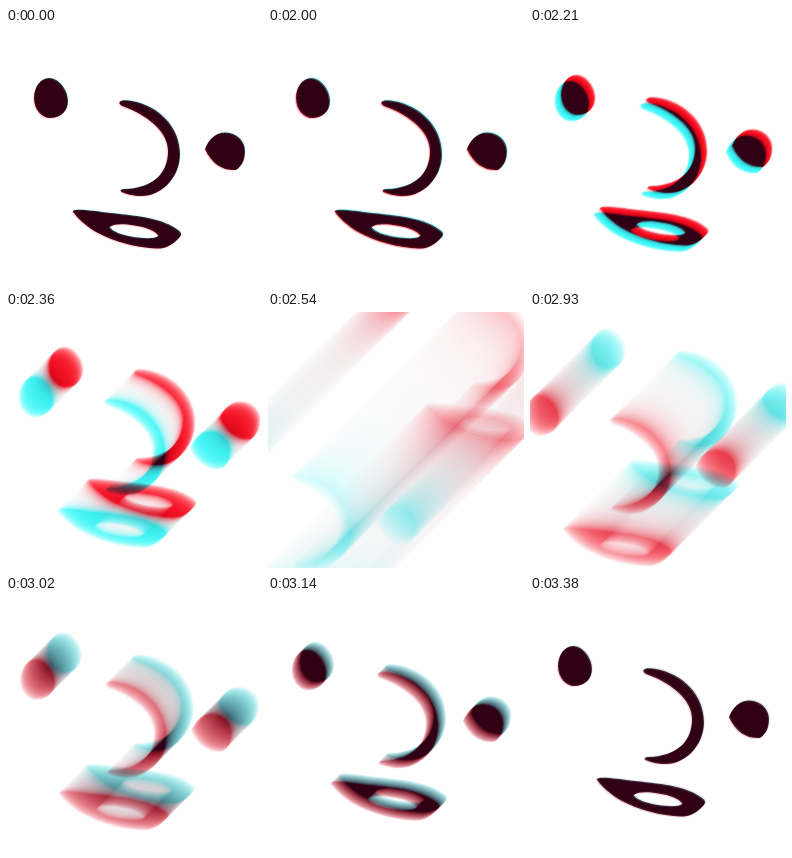
Write an HTML page with a canvas that moves like this. It is 256 px wide and 256 px high and loops after 3410 ms.

```html
<!DOCTYPE html>
<html lang="en">
<head>
<meta charset="utf-8">
<title>Face smear</title>
<style>
  html, body { margin: 0; width: 100%; height: 100%; overflow: hidden; background: #fff; }
  canvas { display: block; width: 100vw; height: 100vh; }
</style>
</head>
<body>
<canvas id="stage" width="256" height="256"></canvas>
<script>
const SIZE = 256, LOOP = 3410, HOLD = 2000, STEP = 30;
const MIDDLE = 2685, REACH = 377, HALVING = 70.5;
const COPIES = 80, FALL = 4.5;
const INK = { r: 207, g: 255, b: 235 }; // light taken away by the full face

const ctx = document.getElementById('stage').getContext('2d');
const image = ctx.createImageData(SIZE, SIZE);

const face = new Path2D([
  'M43 50C53 50 62 62 62 73C62 83 55 90 44 90C36 90 28 82 28 70C28 60 34 50 43 50Z',
  'M199 121C203 111 210 104 220 104.5C231 105 239 113 239 123C239 132 236 138 230 142C218 143 206 137 199 121Z',
  'M114 73.5C116 72 122 72 126 73C153 78 174 99 174 126C174 150 155 168 136 168C127 168 119 166 115 163.5C114 162 115 161 118 161C150 160 162 143 162 123C162 105 144 88 116 78C113 76 113 74 114 73.5Z',
  'M66.5 183C70 180 88 183 105 185C135 188 158 191 172 202C176 205 176 207 173 210C166 218 158 221 150 220.5C132 220 108 214 90 204C80 198 71 190 66.5 183Z',
  'M103.5 199C109 195.5 118 196 128 197.5C140 199 150 203 152.5 208C148 211 138 210.5 128 209C116 207 107 204 103.5 199Z'
].join(''));

// Covered pixels of the face as { x, y, a }
function readMask() {
  const c = document.createElement('canvas');
  c.width = c.height = SIZE;
  const g = c.getContext('2d');
  g.fill(face, 'evenodd');
  const data = g.getImageData(0, 0, SIZE, SIZE).data;
  const dots = [];
  for (let i = 0; i < SIZE * SIZE; i++) {
    const a = data[i * 4 + 3] / 255;
    if (a) dots.push({ x: i % SIZE, y: i / SIZE | 0, a });
  }
  return dots;
}

const dots = readMask();
const cyan = new Float32Array(SIZE * SIZE);
const red = new Float32Array(SIZE * SIZE);

// Copies lie at k from -1 to 1; their weight peaks at k = 1
const ks = Array.from({ length: COPIES }, (_, i) => 2 * i / (COPIES - 1) - 1);
const peaks = ks.map(k => Math.exp(-FALL * (1 - k)));
const peakSum = peaks.reduce((a, b) => a + b);

// Signed diagonal distance of the colour split: shoots out, returns from the other side
function split(t) {
  if (t < HOLD) return -0.2;
  if (t >= MIDDLE) return -REACH * 2 ** ((MIDDLE - t) / HALVING);
  const windUp = 0.85 * Math.max(0, 1 - (t - HOLD) / 200);
  return REACH * 2 ** ((t - MIDDLE) / HALVING) - windUp;
}

// Weights of whole-pixel shifts: a peak at the end plus an even trail
function trail(d, returning) {
  const len = Math.abs(d);
  const far = Math.max(0.2, 0.93 - 0.0033 * len);
  const peak = returning ? Math.min(far, 0.25 + 0.0125 * len) : far;
  const taps = new Map();
  const add = (shift, w) => taps.set(shift, (taps.get(shift) || 0) + w);
  ks.forEach((k, i) => {
    const w = peak * peaks[i] / peakSum + (1 - peak) / COPIES;
    const base = Math.floor(k * d), part = k * d - base;
    add(base, w * (1 - part));
    add(base + 1, w * part);
  });
  return taps;
}

function smear(out, taps, sign) {
  out.fill(0);
  for (const [shift, w] of taps) {
    const s = shift * sign;
    if (!w || Math.abs(s) >= SIZE) continue;
    for (const p of dots) {
      const x = p.x + s, y = p.y - s;
      if (x >= 0 && x < SIZE && y >= 0 && y < SIZE) out[y * SIZE + x] += p.a * w;
    }
  }
}

function draw(t) {
  const taps = trail(split(t), t >= MIDDLE);
  smear(red, taps, 1);
  smear(cyan, taps, -1);
  const px = image.data;
  for (let i = 0, o = 0; i < red.length; i++, o += 4) {
    px[o] = 255 - INK.r * cyan[i];
    px[o + 1] = 255 - INK.g * red[i];
    px[o + 2] = 255 - INK.b * red[i];
    px[o + 3] = 255;
  }
  ctx.putImageData(image, 0, 0);
}

const start = performance.now();
let shown = -1;

function tick() {
  const t = Math.max(0, performance.now() - start) % LOOP;
  const at = t < HOLD ? 0 : HOLD + Math.floor((t - HOLD) / STEP) * STEP;
  if (at !== shown) draw(shown = at);
  requestAnimationFrame(tick);
}
tick();
</script>
</body>
</html>
```
